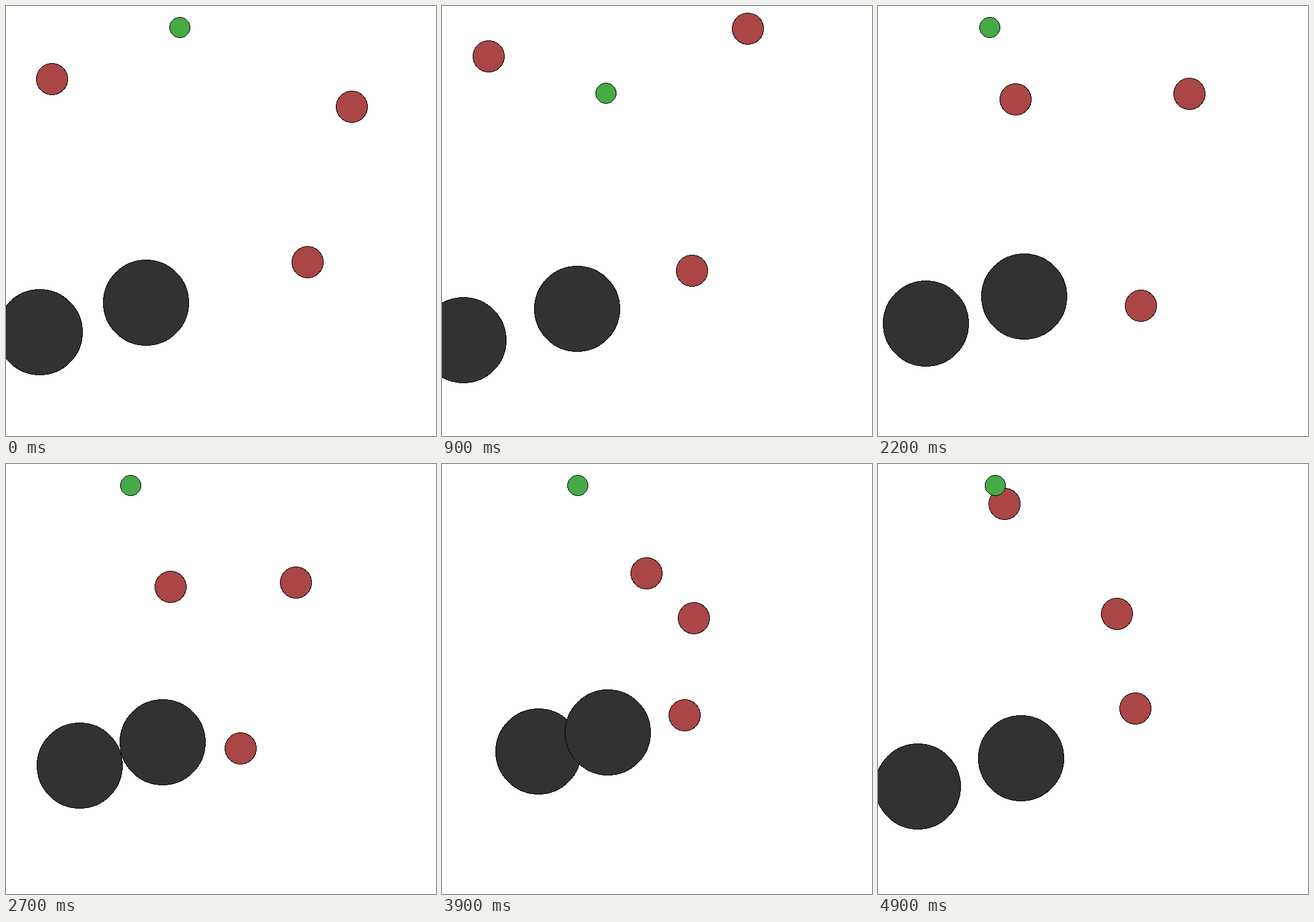
These frames come from a looping animation (700 px wide and 700 px high, 5000 ms). An HTML page:

```html
<!DOCTYPE html>
<html lang="en">
<head>
<meta charset="utf-8">
<title>Drifting circles</title>
<style>
  html, body { margin: 0; width: 100%; height: 100%; overflow: hidden; background: #fff; }
  svg { display: block; width: 100%; height: 100%; }
  circle { stroke: #000; stroke-width: 1; shape-rendering: crispEdges; }
  .red { fill: #aa4646; }
  .dark { fill: #323232; }
  .green { fill: #46aa46; }
</style>
</head>
<body>
<svg viewBox="0 0 700 700">
  <circle class="red" id="redA" r="25.5"/>
  <circle class="red" id="redB" r="25.5"/>
  <circle class="red" id="redC" r="25.5"/>
  <circle class="dark" id="darkA" r="69.5"/>
  <circle class="dark" id="darkB" r="69.5"/>
  <circle class="green" id="dot" r="16.5"/>
</svg>
<script>
const LOOP = 5000, STEP = 100, WALL = 35;

// Every circle turns at the same few moments
const beats = [0, 900, 1600, 2200, 3200, 3900, 4900];

// Key positions at the beats; sway = [segment, sideways reach within it]
const movers = {
  dot:  { x: [283, 267, 306, 182, 223, 221, 191], y: [35, 142, 125, 35, 35, 35, 35] },
  redA: { x: [75, 76, 171, 224, 305, 333, 206], y: [119, 82, 116, 152, 231, 178, 65] },
  redB: { x: [563, 498, 501, 507, 427, 410, 389], y: [164, 37, 35, 143, 227, 251, 244],
          sway: [2, 33] },
  redC: { x: [491, 407, 431, 428, 338, 395, 419], y: [417, 431, 442, 488, 429, 409, 398],
          sway: [5, 26] }
};
const pair = { x: [55, 35, 72, 78, 158, 157, 65], sway: [2, -40] };

const slope = (v, i) => (v[i + 1] - v[i]) / (beats[i + 1] - beats[i]);

// Smooth tangent that never overshoots; the ends run out freely
function tangent(v, i) {
  const last = v.length - 1;
  if (i === 0) return (3 * slope(v, 0) - tangent(v, 1)) / 2;
  if (i === last) return (3 * slope(v, last - 1) - tangent(v, last - 1)) / 2;
  const m = slope(v, i - 1), n = slope(v, i);
  return m * n > 0 ? 2 * m * n / (m + n) : 0;
}

function segment(t) {
  let i = 0;
  while (i < beats.length - 2 && t >= beats[i + 1]) i++;
  const span = beats[i + 1] - beats[i];
  return { i, span, u: (t - beats[i]) / span };
}

function glide(v, { i, span, u }) {
  const w = 1 - u;
  return w * w * ((1 + 2 * u) * v[i] + u * span * tangent(v, i)) +
         u * u * ((1 + 2 * w) * v[i + 1] - w * span * tangent(v, i + 1));
}

function across({ x, sway = [] }, s) {
  const push = sway[0] === s.i ? sway[1] * Math.sin(Math.PI * s.u) ** 2 : 0;
  return Math.max(WALL, glide(x, s) + push);
}

function place(id, x, y) {
  const c = document.getElementById(id);
  c.setAttribute("cx", Math.round(x));
  c.setAttribute("cy", Math.round(y));
}

function draw(t) {
  const s = segment(t);
  for (const id in movers) {
    place(id, across(movers[id], s), Math.max(WALL, glide(movers[id].y, s)));
  }
  // The dark pair slides along two fixed lines in step
  const x = across(pair, s), d = x - WALL;
  place("darkA", x, 544 - 0.627 * d);
  place("darkB", 220.35 + 0.4065 * d, 492.7 - 0.4605 * d);
}

const start = performance.now();
function tick() {
  const t = (performance.now() - start) % LOOP;
  draw(Math.floor(t / STEP) * STEP);
  requestAnimationFrame(tick);
}
draw(0);
requestAnimationFrame(tick);
</script>
</body>
</html>
```
